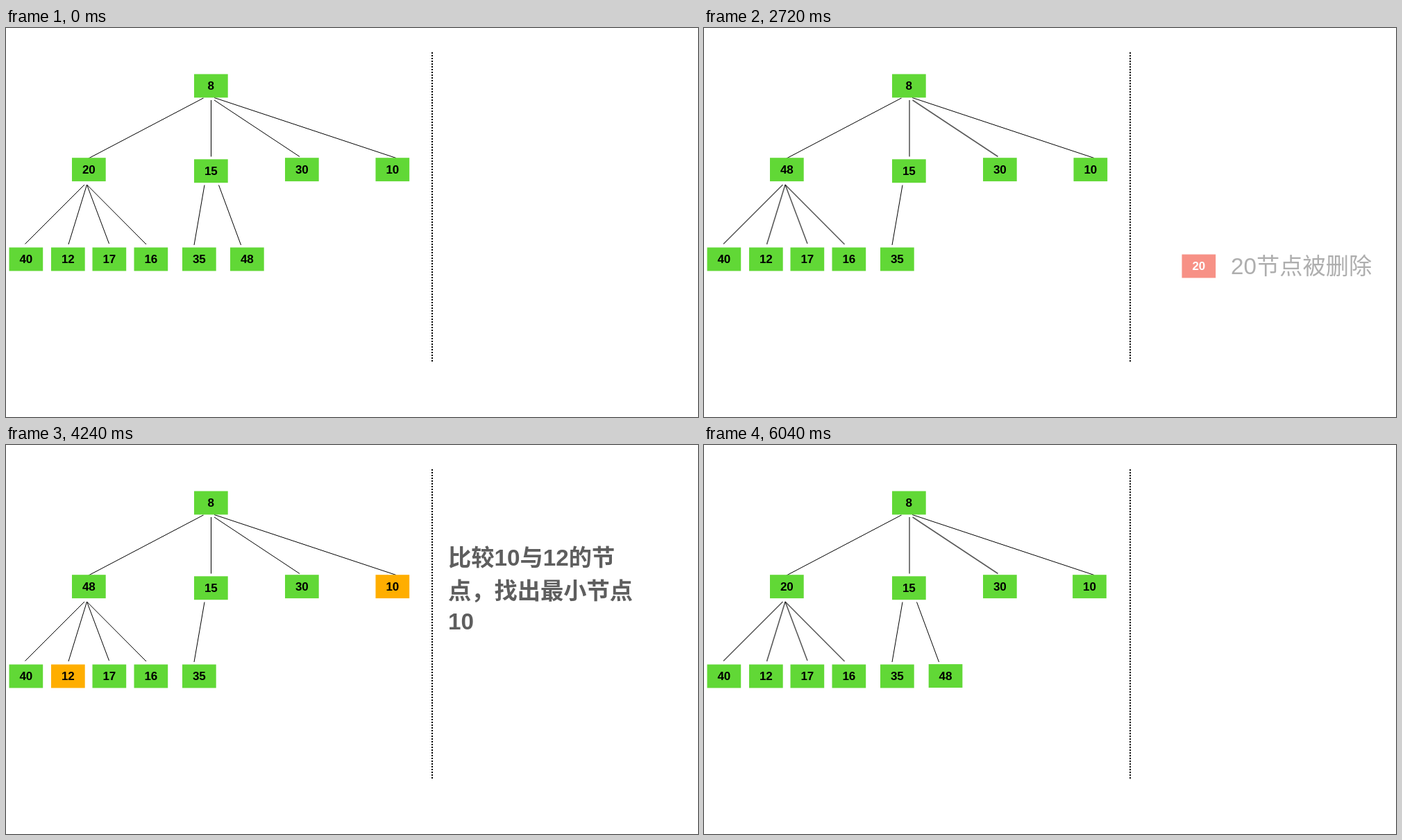
Write an HTML page with a canvas that moves like this. It is 997 px wide and 561 px high and loops after 6.08 s.

```html
<!DOCTYPE html>
<html lang="zh">
<head>
<meta charset="utf-8">
<title>Heap deletion</title>
<style>
  html, body { margin: 0; width: 100%; height: 100%; overflow: hidden; background: #fff; }
  canvas { display: block; }
</style>
</head>
<body>
<canvas id="stage" width="997" height="561"></canvas>
<script>
const ctx = document.getElementById('stage').getContext('2d');
const LOOP = 6080, STEP = 40;
const BOX_W = 48.7, BOX_H = 33.9;
const FONT = '"Liberation Sans", Arial, "Noto Sans CJK SC", "Noto Sans CJK", sans-serif';

const GREEN = [97, 216, 54], ORANGE = [255, 174, 0], RED = [238, 34, 12];
const BLACK = [0, 0, 0], WHITE = [255, 255, 255];

// Named places in the tree and on the right-hand side
const LEFT = [95, 187.2], RIGHT = [532.5, 187.2], LEAF = [323, 316.5], ASIDE = [688.5, 326.5];

const node = (pos, fill = GREEN, alpha = 1) => ({ pos, fill, alpha });
const caption = (x, y, ...lines) => ({ x, y, lines, weight: 'bold' });

const fixedNodes = {
  8: node([271, 66.5]), 15: node([271, 189.3]), 30: node([402, 187.2]),
  17: node([124.5, 316.5]), 16: node([184.5, 316.5]), 35: node([254, 316.5])
};

const links = [
  [284.5, 101, 119, 188], [295.5, 104, 295.5, 185.5],
  [300, 104, 423, 185.5], [300, 100.5, 562, 187.5],
  [113, 226, 27.5, 311.5], [116.5, 226, 90, 312],
  [116.5, 226, 148.5, 311], [116.5, 226, 202, 312],
  [286, 226.5, 271, 313]
];
const sharpLinks = [0, 3, 8];
const lastLink = [306.5, 226.5, 338.5, 313];

// Each state builds on the previous one; "out" is what is left of a
// vanishing part after the first step.
const states = [];
function state(start, steps, change) {
  const prev = states[states.length - 1] || { nodes: {} };
  states.push({
    start, steps, out: change.out || 0.5, text: change.text,
    nodes: { ...prev.nodes, ...change.nodes },
    link: change.link || prev.link
  });
}

state(0, 0, {
  nodes: {
    40: node([4.5, 316.5]), 12: node([65, 316.5]),
    48: node(LEAF), 10: node(RIGHT), 20: node(LEFT)
  },
  link: { dx: 0, alpha: 1 }
});
state(400, 6, {
  text: caption(636, 217, '删除值为20的节点'),
  nodes: { 20: node(LEFT, RED) }
});
state(1000, 5, {
  text: caption(636, 217, '将20与48节点互换'),
  nodes: { 20: node(LEAF, RED), 48: node(LEFT) },
  link: { dx: -6.5, alpha: 1 }
});
state(1560, 6, {
  out: 0.7,
  nodes: { 20: node(ASIDE, RED) },
  link: { dx: -6.5, alpha: 0 }
});
state(2120, 6, {
  text: { ...caption(759, 355, '20节点被删除'), weight: 'normal' }
});
state(2720, 6, {
  text: caption(636, 217, '比较节点48的孩子节点'),
  nodes: { 20: node(ASIDE, RED, 0) }
});
state(3280, 8, {
  text: caption(636, 194, '比较40与12的节点，', '找出最小节点 12'),
  nodes: { 40: node([4.5, 316.5], ORANGE), 12: node([65, 316.5], ORANGE) }
});
state(3960, 8, {
  text: caption(637, 174, '比较10与12的节', '点，找出最小节点', '10'),
  nodes: { 40: node([4.5, 316.5]), 10: node(RIGHT, ORANGE) }
});
state(4640, 8, {
  text: caption(637, 219, '节点10与48更换位置'),
  nodes: { 12: node([65, 316.5]), 10: node(LEFT, ORANGE), 48: node(RIGHT) }
});
state(5320, 5, {
  out: 0.3,
  nodes: { 10: node(LEFT) }
});
states.push({ ...states[0], start: 5880, steps: 6 });

const clamp = v => Math.max(0, Math.min(1, v));
const mix = (a, b, p) => a + (b - a) * p;
const mixAll = (a, b, p) => a.map((v, i) => mix(v, b[i], p));
const rgb = c => `rgb(${c.map(Math.round).join(',')})`;
const ease = p => p < 0.5 ? 16 * p ** 5 : 1 - 16 * (1 - p) ** 5;
const labelColor = n => n.fill === RED ? WHITE : BLACK;

// Box and label fade as one piece towards the white page.
function drawNode(label, pos, fill, ink, alpha) {
  if (alpha <= 0) return;
  const [x, y] = pos;
  ctx.globalAlpha = 1;
  ctx.fillStyle = rgb(mixAll(WHITE, fill, alpha));
  ctx.fillRect(x, y, BOX_W, BOX_H);
  ctx.fillStyle = rgb(mixAll(WHITE, ink, alpha));
  ctx.font = `bold 17px ${FONT}`;
  ctx.textAlign = 'center';
  ctx.fillText(label, x + BOX_W / 2, y + BOX_H / 2 + 6);
}

function drawLink([x1, y1, x2, y2], soft, alpha = 1, dx = 0) {
  const shift = dx + (soft ? 0.5 : 0);
  ctx.globalAlpha = alpha * (soft ? 0.65 : 1);
  ctx.lineWidth = soft ? 1.6 : 1;
  ctx.beginPath();
  ctx.moveTo(x1 + shift, y1);
  ctx.lineTo(x2 + shift, y2);
  ctx.stroke();
}

function drawDivider(moving) {
  ctx.globalAlpha = 1;
  ctx.lineWidth = moving ? 1.8 : 2;
  ctx.setLineDash(moving ? [2.3, 1.7] : [2, 2]);
  ctx.beginPath();
  ctx.moveTo(614, 35);
  ctx.lineTo(614, 481.5);
  ctx.stroke();
  ctx.setLineDash([]);
}

function drawCaption(text, alpha) {
  if (!text || alpha <= 0) return;
  ctx.globalAlpha = alpha;
  ctx.fillStyle = '#5e5e5e';
  ctx.font = `${text.weight} 33.25px ${FONT}`;
  ctx.textAlign = 'left';
  text.lines.forEach((line, i) => ctx.fillText(line, text.x, text.y + i * 48 - (i > 1 ? 4 : 0)));
}

function render(time) {
  const index = states.findLastIndex(s => s.start <= time);
  const to = states[index], from = states[Math.max(0, index - 1)];
  const k = Math.floor((time - to.start) / STEP) + 1;
  const moving = k < to.steps;
  const p = moving ? (k - 0.5) / (to.steps - 0.5) : 1;
  const fadeOut = moving ? clamp(1 - (1 - to.out) * k) : 0;
  const fadeIn = moving ? clamp((p - 0.3) / 0.5) : 1;
  const move = ease(p), tint = p ** 1.2;
  const fade = (a, b) => a === b ? a : b > a ? fadeIn : fadeOut;

  ctx.globalAlpha = 1;
  ctx.fillStyle = '#fff';
  ctx.fillRect(0, 0, 997, 561);
  ctx.strokeStyle = '#000';

  drawDivider(moving);
  links.forEach((l, i) => drawLink(l, moving && !sharpLinks.includes(i)));
  const dx = from.link.alpha ? mix(from.link.dx, to.link.dx, move) : to.link.dx;
  drawLink(lastLink, false, fade(from.link.alpha, to.link.alpha), dx);

  for (const [label, n] of Object.entries(fixedNodes))
    drawNode(label, n.pos, n.fill, BLACK, 1);
  for (const label in to.nodes) {
    const a = from.nodes[label], b = to.nodes[label];
    const start = a.alpha ? a : b;
    drawNode(label, mixAll(start.pos, b.pos, move), mixAll(start.fill, b.fill, tint),
      mixAll(labelColor(start), labelColor(b), tint), fade(a.alpha, b.alpha));
  }

  if (moving) drawCaption(from.text, fadeOut);
  drawCaption(to.text, fadeIn);
  ctx.globalAlpha = 1;
}

function tick() {
  render(performance.now() % LOOP);
  requestAnimationFrame(tick);
}
tick();
</script>
</body>
</html>
```
